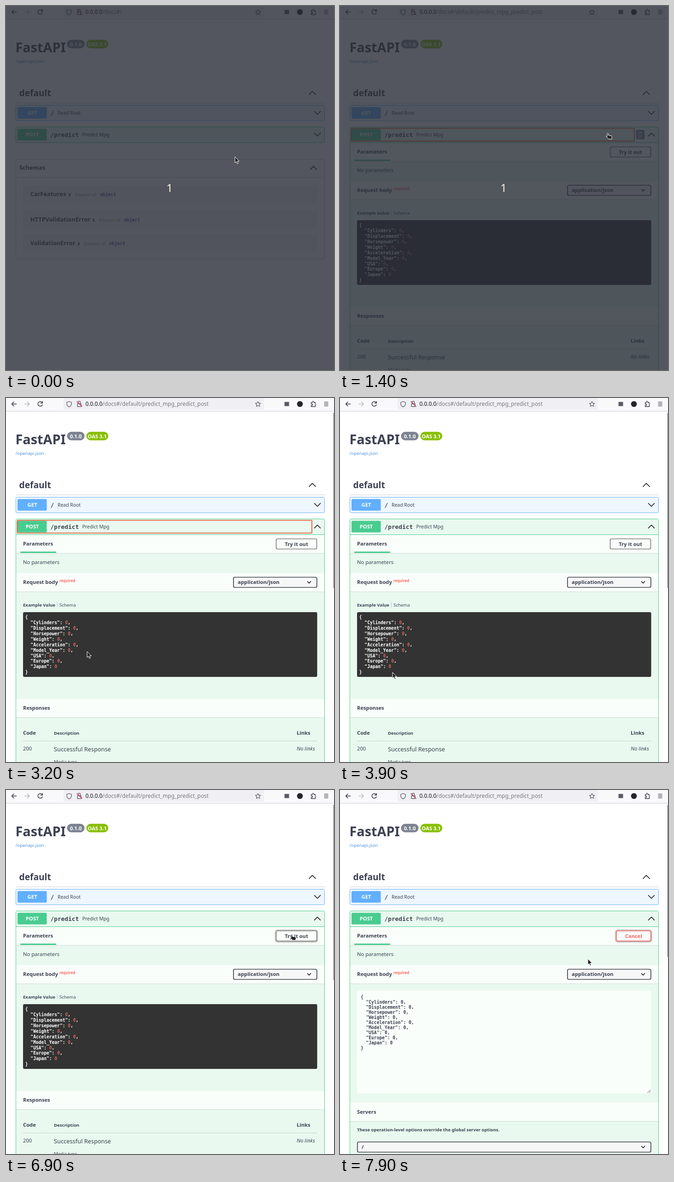
An HTML page for the animation above (8000 ms loop, 712 by 787 pixels).

```html
<!DOCTYPE html>
<html lang="en">
<head>
<meta charset="utf-8">
<title>API docs</title>
<style>
html, body { margin: 0; width: 100%; height: 100%; overflow: hidden; background: #fff; }
svg { display: block; width: 712px; height: 787px; }
text { font-family: "Noto Sans", sans-serif; fill: #3b4151; }
.b { font-weight: 700; }
.i { font-style: italic; }
.m { font-family: "DejaVu Sans Mono", monospace; font-weight: 700; }
.mid { text-anchor: middle; }
.line { fill: none; stroke-linecap: round; stroke-linejoin: round; }
.glow { filter: blur(1.5px); }
</style>
</head>
<body>
<svg id="stage" viewBox="0 0 712 787"></svg>
<script>
const GREEN = '#49cc90', BLUE = '#61affe', INK = '#3b4151', RED = '#ff6060';
const MINT = '#e9f9ef', PALE = '#fafefb', RULE = 'rgba(59,65,81,.25)';

const text = (x, y, size, str, cls = '', fill = '') =>
  `<text x="${x}" y="${y}" font-size="${size}" class="${cls}"${fill && ` style="fill:${fill}"`}>${str}</text>`;
const rect = (x, y, w, h, fill, extra = '') =>
  `<rect x="${x}" y="${y}" width="${w}" height="${h}" fill="${fill}" ${extra}/>`;
const box = (x, y, w, h, fill, stroke, width = 1, rx = 3) =>
  rect(x, y, w, h, fill, `stroke="${stroke}" stroke-width="${width}" rx="${rx}"`);
const line = (d, stroke = '#222', width = 1.5) =>
  `<path class="line" d="${d}" stroke="${stroke}" stroke-width="${width}"/>`;
const chevron = (x, y, size, dir) =>
  line(`M${x - size} ${y - dir * size / 2}l${size} ${dir * size}l${size} ${-dir * size}`, '#111', 1.6);
const group = (id, body) => `<g id="${id}">${body}</g>`;

function toolbar() {
  const dark = '#3a3a44';
  return rect(0, 0, 712, 28, '#f9f9fb') + rect(0, 28, 712, 1, '#ccccd0') +
    rect(125, -6, 435, 31, '#f0f0f4', 'rx="4"') +
    line('M22.5 13H12.5M17 8.5L12.5 13L17 17.5', dark) +
    line('M41 13H51M46.5 8.5L51 13L46.5 17.5', '#bbbbc0') +
    line('M78.5 10A5 5 0 1 0 79 14.5M79.3 7.5V11H75.5', dark) +
    line('M137 7.5L142 9.3V12.5C142 16 140 18 137 19.3C134 18 132 16 132 12.5V9.3Z', '#5b5b66', 1.3) +
    line('M156.5 12V9.5A2.5 2.5 0 0 1 161.5 9.5V12M155 12.5H163V18.5H155Z', '#5b5b66', 1.3) +
    line('M154 7.5L165 18.5', '#e22850', 1.5) +
    `<text y="17" font-size="11.9"><tspan x="172.5" fill="#15141a">0.0.0.0</tspan><tspan id="path" fill="#77777f"></tspan></text>` +
    line('M547 7.5L548.7 11.2L552.6 11.6L549.7 14.3L550.5 18.2L547 16.2L543.5 18.2L544.3 14.3L541.4 11.6L545.3 11.2Z', '#5b5b66', 1.2) +
    rect(604.5, 8.5, 10, 9, '#5b5b66') + '<circle cx="638" cy="13" r="6.3" fill="#25252c"/>' +
    line('M662.5 10H665V8.8A1.7 1.7 0 0 1 668.4 8.8V10H671.5V18.5H662.5V16H664A1.6 1.6 0 0 0 664 12.8H662.5Z', dark, 1.3) +
    line('M691 9.2H699M691 13H699M691 16.8H699', dark, 1.3);
}

function header() {
  return text(20.5, 100, 28.8, 'FastAPI', 'b') +
    rect(132.5, 73, 38, 18.5, '#7d8492', 'rx="9.2"') + text(151.5, 86.5, 11.2, '0.1.0', 'b mid', '#fff') +
    rect(174.5, 73, 47.5, 18.5, '#89bf04', 'rx="9.2"') + text(198, 86.5, 11.2, 'OAS 3.1', 'b mid', '#fff') +
    text(20.8, 122.5, 9.6, '/openapi.json', '', '#4990e2') +
    text(28.5, 195, 19.2, 'default', 'b') + rect(21, 209, 671, 1, RULE) + chevron(665, 188, 7, -1);
}

const route = (y, color, verb, path, summary) =>
  rect(25, y + 4.5, 63.5, 25, color, 'rx="2.5"') + text(57, y + 21, 11.2, verb, 'b mid', '#fff') +
  text(96.5, y + 22, 12.8, path, 'm') + text(path.length > 1 ? 165.5 : 112, y + 21, 10.4, summary);

function schemas() {
  const models = [['CarFeatures', 388, 39, 411, 138], ['HTTPValidationError', 443, 38, 466, 190], ['ValidationError', 494, 37, 517, 158]];
  return box(21.5, 331.5, 670, 215.5, 'none', RULE) + text(29, 354, 12.8, 'Schemas', 'b') +
    chevron(667.5, 350, 7, -1) + rect(21, 370, 671, 1, RULE) +
    models.map(([name, top, height, y, x]) =>
      rect(37, top, 639, height, 'rgba(0,0,0,.04)', 'rx="3"') + text(52.8, y, 12.8, name, 'b') +
      line(`M${x - 1.5} ${y - 6}l3 3l-3 3`, '#111', 1.5) +
      text(x + 12, y, 9.6, 'Expand all', '', '#999') + text(x + 66, y, 9.6, 'object', 'm', '#5555aa')).join('');
}

const section = (y, height, title) =>
  rect(22, y, 669, height, PALE) + rect(22, y + height, 669, 1, 'rgba(0,0,0,.12)') + text(37, y + height - 16.5, 11.2, title, 'b');

// One line per JSON key, closed by braces.
function json(x, y, pitch, ink, number) {
  const keys = ['Cylinders', 'Displacement', 'Horsepower', 'Weight', 'Acceleration', 'Model_Year', 'USA', 'Europe', 'Japan'];
  return text(x, y, 9.6, '{', 'm', ink) + keys.map((key, i) =>
    text(x + 11.56, y + pitch * (i + 1), 9.6,
      `"${key}": <tspan style="fill:${number}">0</tspan>${i < keys.length - 1 ? ',' : ''}`, 'm', ink)).join('') +
    text(x, y + pitch * (keys.length + 1), 9.6, '}', 'm', ink);
}

const select = (x, y, w, label) =>
  box(x, y, w, 22, '#f7f7f7', '#41444e', 1.7) + text(x + 9.2, y + 14.8, 11.2, label, 'b') + chevron(658, y + 11, 3.5, 1);
const button = (x, w, label, stroke, ink, glowId) =>
  `<rect id="${glowId}" class="glow" x="${x}" y="304.5" width="${w}" height="22.5" rx="3" fill="none" stroke="#000" stroke-opacity=".35" stroke-width="4"/>` +
  box(x, 304.5, w, 22, PALE, stroke, 1.7) + text(x + w / 2, 319.5, 11.2, label, 'b mid', ink);

const openPanel = () =>
  rect(22, 295, 669, 1, GREEN) + section(296, 39.5, 'Parameters') + rect(31, 332, 78, 3, GREEN) +
  text(37, 359, 11.2, 'No parameters') + section(378.5, 40, 'Request body') +
  text(116, 398, 8, 'required', 'b', 'rgba(255,0,0,.6)') + select(493.8, 387.5, 181, 'application/json') + chevron(676, 278, 6.5, -1);

const exampleView = () =>
  button(586.5, 88, 'Try it out', '#808080', INK, 'tryGlow') +
  text(37, 450.5, 9.6, 'Example Value', 'b') + rect(111, 441, 1, 12, RULE) + text(116, 450.5, 9.6, 'Schema') +
  rect(37, 463, 638.5, 140, '#333', 'rx="3"') + json(41.8, 477, 11.93, '#fff', '#d36363') +
  section(651, 39.5, 'Responses') + text(37, 727.5, 11.2, 'Code', 'b') + text(104, 727.5, 9.6, 'Description', 'b') +
  text(631, 727.5, 11.2, 'Links', 'b') + rect(37, 741, 638.5, 1, 'rgba(59,65,81,.2)') + text(37, 762, 11.2, '200') +
  text(104, 764, 12.8, 'Successful Response') + text(631, 762, 11.2, 'No links', 'i') + text(104, 790, 9.6, 'Media type');

const editView = () =>
  button(599.8, 75, 'Cancel', RED, RED, 'cancelGlow') +
  rect(37, 434, 638.5, 222, PALE, 'rx="3"') + json(45, 451, 10.95, INK, INK) +
  line('M667.5 654.5L674 648M671 654.5L674 651.5', '#666', 1) +
  section(676, 40, 'Servers') +
  text(37, 738, 9.6, 'These operation-level options override the global server options.', 'b') + select(37.8, 761, 637, '/');

const clipboard = '<path class="line" d="M649 273.5H655V284H649ZM650.5 272.5H653.5M651 277H653M651 280H653" stroke="#fff" stroke-width="1"/>';
const ARROW = 'M0 0V13L3 10.3L5 15L7.2 14L5.2 9.5H9.3Z';
const HAND = 'M0 1.4Q0 0 1.3 0Q2.6 0 2.6 1.4V4.6L9 5.8Q10.4 6.2 10.4 7.8L9.8 12.8H3.4L-1.8 8Q-2.6 6.6 -1.2 6.3L0 7.2Z';

document.getElementById('stage').innerHTML =
  rect(0, 0, 712, 787, '#fff') + toolbar() + header() +
  box(21.5, 214.5, 670, 33.5, '#eef6fe', BLUE) + route(214, BLUE, 'GET', '/', 'Read Root') + chevron(676, 231, 6.5, 1) +
  `<rect id="post" x="21.5" y="261.5" width="670" rx="3" fill="${MINT}" stroke="${GREEN}"/>` +
  route(261, GREEN, 'POST', '/predict', 'Predict Mpg') +
  group('closed', chevron(676, 278, 6.5, 1) + schemas()) +
  group('opened', openPanel() + group('example', exampleView()) + group('edit', editView())) +
  group('copy', rect(0, 268, 0, 20, '#7d8293', 'id="copyBox" rx="3"') + group('copyIcon', clipboard)) +
  '<rect id="focus" x="24.5" y="264.5" height="27.5" rx="1" fill="none" stroke="#e8491d" stroke-width="1.6"/>' +
  rect(711, 32, 1, 379, '#55555c', 'id="scroll"') +
  group('dim', rect(0, 0, 712, 787, 'rgba(40,44,54,.8)') + text(355, 401.5, 24, '1', 'mid', '#fbf6dc')) +
  '<path id="cursor" fill="#222" stroke="#fff" stroke-width="1" stroke-linejoin="round"/>';

const $ = id => document.getElementById(id);
const set = (id, attrs) => Object.entries(attrs).forEach(([k, v]) => $(id).setAttribute(k, v));
const show = (id, on) => { $(id).style.display = on ? '' : 'none'; };
const clamp = v => Math.min(1, Math.max(0, v));
const easeOut = v => 1 - (1 - clamp(v)) ** 2.4;

// Cursor stops: time, x, y.
const stops = [
  [100, 497, 326], [400, 44, 285], [700, 694, 192], [1000, 580, 275], [2700, 580, 275],
  [3100, 191, 541], [3200, 176, 548], [3600, 150, 572], [3900, 114, 593], [4500, 114, 593],
  [4800, 68, 594], [4900, 68, 594], [5000, 67, 594], [5100, 67, 594], [5400, 62, 592],
  [5900, 62, 592], [6800, 619, 312], [7800, 619, 312], [7900, 538, 365]
];

function cursorAt(t) {
  const next = stops.findIndex(s => s[0] >= t);
  if (next < 0) return stops.at(-1).slice(1);
  if (next === 0) return stops[0].slice(1);
  const [t0, x0, y0] = stops[next - 1], [t1, x1, y1] = stops[next];
  const u = (t - t0) / (t1 - t0), k = u * u * (3 - 2 * u);
  return [x0 + (x1 - x0) * k, y0 + (y1 - y0) * k];
}

function render(time) {
  const t = Math.floor(time / 100) * 100;
  const open = t >= 1400, editing = t >= 7500;

  $('path').textContent = '/docs#/' + (open ? 'default/predict_mpg_predict_post' : '');
  show('closed', !open);
  show('opened', open);
  show('example', !editing);
  show('edit', editing);
  set('post', { height: open ? 560 : 34 });
  show('dim', t < 3200);
  show('scroll', (t >= 1600 && t < 2600) || t >= 2800);
  set('scroll', { height: editing ? 329 : 379 });
  set('tryGlow', { opacity: clamp((t - 6600) / 300) });

  // The copy button widens on hover and squeezes the focus ring.
  const squeeze = easeOut((t - 850) / 500) - easeOut((t - 2800) / 500);
  const gap = 1 - squeeze;
  show('focus', t >= 1100 && t < 3700);
  set('focus', { width: 614.5 + 25.5 * gap });
  show('copy', squeeze > 0);
  set('copyBox', { x: 643 + 21 * gap, width: 18 * squeeze });
  show('copyIcon', squeeze > .7);

  const [x, y] = cursorAt(t);
  const overRow = x > 21 && x < 692 && ((y > 214 && y < 248) || (y > 261 && y < 295));
  const overButton = x > 586 && x < 675 && y > 304 && y < 327 && open;
  set('cursor', { d: overRow || overButton ? HAND : ARROW, transform: `translate(${x} ${y})` });
}

const start = performance.now();
function tick() {
  render((performance.now() - start) % 8000);
  requestAnimationFrame(tick);
}
tick();
</script>
</body>
</html>
```
